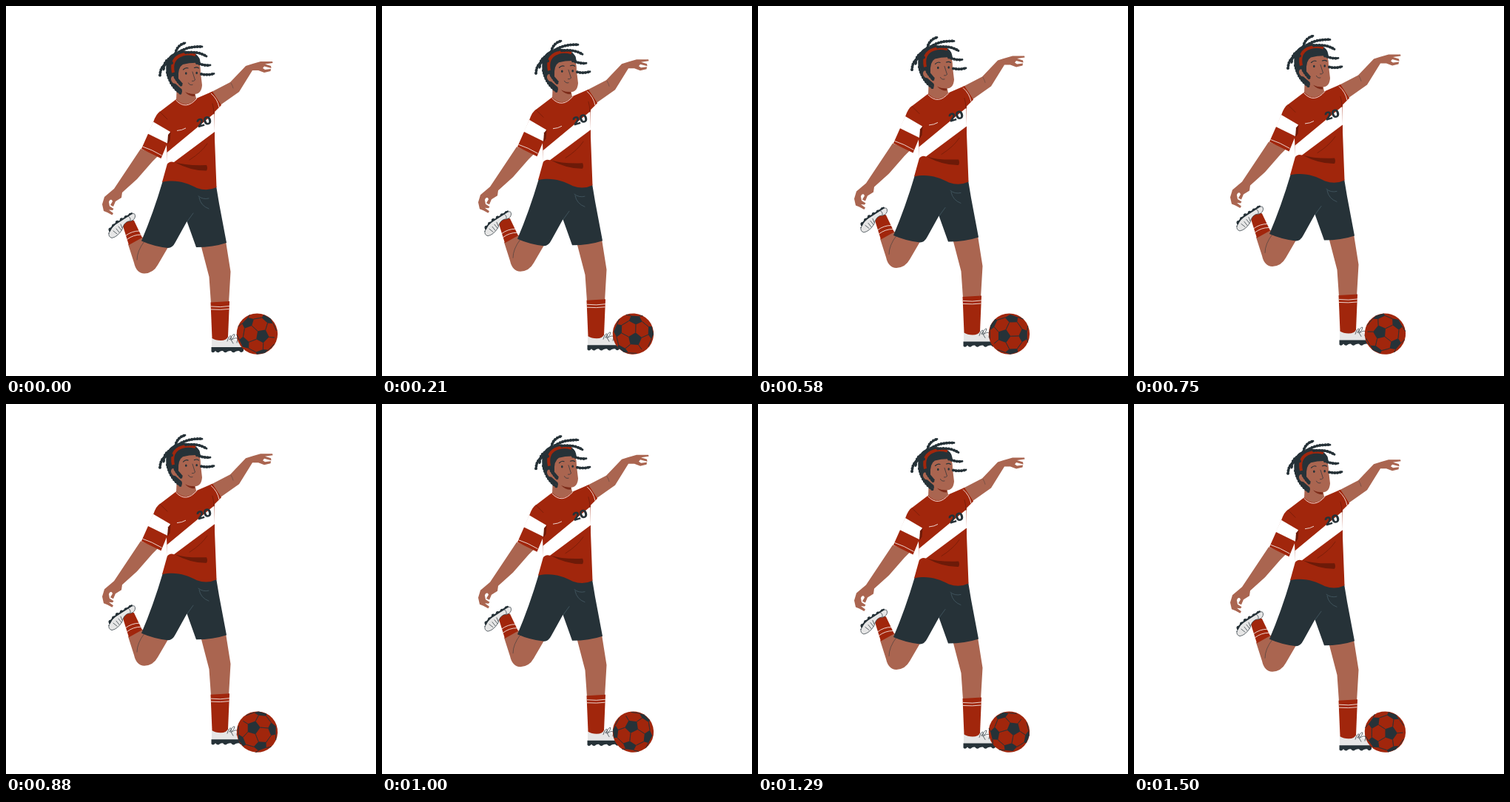
Write an HTML page that moves like this. It is 500 by 500 pixels and loops after 1540 ms.

```html
<!DOCTYPE html>
<html lang="en">
<head>
<meta charset="utf-8">
<title>Football player</title>
<style>
  html, body { margin: 0; width: 100%; height: 100%; overflow: hidden; background: #fff; }
  svg { display: block; width: 100%; height: 100%; }
  .red { fill: #a1260c; }
  .dark { fill: #263238; }
  .skin { fill: #aa6550; }
  .shoe { fill: #e6e6e6; }
  .fold { fill: #6d1a08; }
  .white { fill: #fff; }
  .line { fill: none; stroke: #263238; stroke-width: .7; stroke-linecap: round; stroke-linejoin: round; }
  .trim { fill: none; stroke: #fff; stroke-width: .8; }
  .seam { fill: none; stroke: #263238; stroke-width: .6; }
  .dread { fill: none; stroke: #263238; stroke-width: 2.8; stroke-linecap: round; }
  .beads { fill: none; stroke: #263238; stroke-width: 4; stroke-linecap: round; stroke-dasharray: 0 3.7; }
  text { font: 900 15.5px Inter, "Open Sans", sans-serif; letter-spacing: -.6px; }
</style>
</head>
<body>
<svg viewBox="0 0 500 500">
  <g id="player">
    <!-- raised arm -->
    <path class="skin" d="M276 117L303 103L324 81Q333 78 344 75L360 75L360.500 77L350 78.500L358 81L358.500 84L349 81.500L347 84L350 86L358 85L357.500 88L349 90L341 87L333 87L315 116L288 135Z"/>
    <path class="line" d="M304 104Q306 107 307 111" stroke-opacity=".5"/>

    <!-- lowered arm -->
    <path class="skin" d="M182 193L146 247L133 258L130 268L132 277L137 279L143.500 282.500L145 280L139 275.500L144 276L145.500 274L140 270.500L139 265Q140 261 143 262L144 264L141 269L145 271L148 264L156 259L157 252L177 234L198 210L206 202Z"/>

    <!-- back leg -->
    <path class="skin" d="M183 312L165 322L173 347Q176 361 187 361.500Q199 361 205 350L219 326Z"/>
    <path class="line" d="M187 318Q177 331 177 343" stroke-opacity=".7"/>
    <path class="red" d="M157 294Q164 285 173 290L184 313L166 323Z"/>
    <path class="trim" d="M161.500 310.500Q170 304 180.500 304M163.500 315.500Q172 309 182.500 309"/>
    <path class="beads" d="M141 302L149 293L171 280.500" style="stroke-dasharray:0 6.800;stroke-width:5"/>
    <path class="shoe line" style="fill:#e6e6e6" d="M139 307Q142 299 149 294L170 281Q175 279 174.500 285Q173 291 165 291Q159 293 157 302Q151 312 143 313.500Q138 312 139 307Z"/>
    <path class="line" d="M140 304Q143 297 150 293L170 280" style="stroke-width:2"/>
    <path class="line" d="M145 304L150 308M149 301L153 306M152 298L156 303M155 295L157 300M165 284Q169 286 168 290"/>

    <!-- standing leg -->
    <path class="skin" d="M263 322L274.500 366L277 402L301 402L303.500 359L297 318Z"/>
    <path class="shoe" d="M278 448L299 446L311 452Q320 455 322 462L278 462Z"/>
    <path class="dark" d="M277.500 461H321V466Q318 470 315 466Q312 466 310 467Q307 470 304 466Q301 466 299 467Q296 470 293 466Q290 466 289 467Q286 470 283 466Q280 470 277.500 467Z"/>
    <path class="red" d="M276.500 400.500L302 399L300 447Q298 452 290 452Q283 452 278.500 449Z"/>
    <path class="trim" d="M277 406Q290 407.500 302 405.500M277 410Q290 411 301.500 409.500"/>
    <path class="line" d="M299 453Q302 444 304 446Q306 449 302 451Q307 442 309 444Q309 448 304 451M304 451L307 456M305 451Q311 447 313 450L312 455"/>

    <!-- shorts -->
    <path class="dark" d="M212 236C228 232 246 239 258 245L284 243L288 267L298 320Q280 326 257 326L244.500 291L229 319Q225 327 219 327Q200 325 183 317.500Q199 280 212 236Z"/>
    <path class="line" style="stroke:#4a606b" d="M260 257Q266 262 274 260M261 259Q263 270 274 274M245 291L253 280"/>

    <!-- neck -->
    <path class="skin" d="M231 105L230 127Q244 140 257 125L255 115Z"/>
    <path class="fold" d="M242 116Q248 119 255 118.500L255 122Q247 122 242 116Z" opacity=".75"/>

    <!-- shirt -->
    <path class="red" d="M230 126Q243 140 257 125L279 115.500L291 134L282 143L282 180L284.500 245Q272 251 258 246C244 239 230 234 211 238L218 213L217 188L209.500 206L183 193L199 157Q203 145 209 142Z"/>
    <path class="white" d="M199 156.500L222 170L218 185.500L191.500 172.500Z"/>
    <path class="white" d="M281.500 145L217.500 198V214Q221 209 227 211L282 170Z"/>
    <path class="fold" d="M222.500 170L221.500 182L218 187L219 174Z"/>
    <path class="fold" d="M228 211Q243 216 271 215Q273 219 271 222.500Q250 223 228 211Z"/>
    <path class="line" style="stroke:#6d1a08" d="M208 143L218 153M248 208Q264 198 272 186M279 132Q281 139 281 146"/>
    <path class="trim" d="M184.500 190Q197 194 210.500 202M231 168.500Q238 168 243 165M277 118Q286 126 288 137M229.500 127Q243 142 258 125"/>
    <text class="dark" transform="translate(259.500 164.500) rotate(-17)">20</text>

    <!-- head -->
    <path class="dark" d="M217 93Q214 73 223 66Q237 56 255 64Q264 70 262 78L236 88L238 117Q225 111 217 93Z"/>
    <path class="skin" d="M233 80Q243 72 259 73Q263 78 263 90L265 107Q264 119 255 119Q244 119 237 112L229 105Q222 104 223 98Q224 93 230 96Z"/>
    <path class="dark" d="M230 73L260 69L263 77Q250 76 239 79Q232 83 233 98L239 105L236 109L227 97Z"/>
    <path fill="none" stroke="#a1260c" stroke-width="4" d="M226 90Q222 71 238 66Q246 63 256 66"/>
    <g id="hair"></g>
    <ellipse class="dark" cx="243.300" cy="91" rx="1.300" ry="1.700"/>
    <ellipse class="dark" cx="257.700" cy="90.500" rx="1.300" ry="1.700"/>
    <path class="line" style="stroke-width:1.200" d="M239.500 86Q243 82.500 246 84M254.500 83.500Q258 82 260.500 84"/>
    <path class="line" d="M252 89L255.500 100Q254 102 251.500 101.500M246.500 104Q248 107.500 252 106.500"/>
  </g>
  <g id="ball"><circle class="red" r="27.700"/></g>
</svg>
<script>
const LOOP = 1540, RADIUS = 27.7;
const player = document.getElementById("player");
const ball = document.getElementById("ball");
const hair = document.getElementById("hair");

function addPath(parent, className, d) {
  const path = document.createElementNS("http://www.w3.org/2000/svg", "path");
  path.setAttribute("class", className);
  path.setAttribute("d", d);
  parent.append(path);
}

// Each braid is a strand with round beads.
[
  "M224 77Q209 77 208 94", "M223 70Q213 74 213 86",
  "M229 64Q231 53 242 50", "M234 62Q247 54 265 55",
  "M243 63Q260 61 271 68", "M258 77Q268 81 276 80",
  "M264 92Q272 94 281 91.500", "M218 90Q222 109 236 118",
  "M227 93Q231 102 237 107"
].forEach(d => ["dread", "beads"].forEach(name => addPath(hair, name, d)));

// Ball panels: icosahedron corners seen from slightly off centre.
function onSphere(polar, turn) {
  const tilt = 17 * Math.PI / 180;
  const x = Math.sin(polar) * Math.cos(turn), y = Math.sin(polar) * Math.sin(turn), z = Math.cos(polar);
  return [x * Math.cos(tilt) + z * Math.sin(tilt), y, z * Math.cos(tilt) - x * Math.sin(tilt)];
}
const dot = (a, b) => a.reduce((sum, v, i) => sum + v * b[i], 0);
function oneThird(a, b) {
  const p = a.map((v, i) => 2 * v + b[i]), length = Math.hypot(...p);
  return p.map(v => v / length);
}
function project([x, y, z]) {
  const k = RADIUS / (z < 0 ? Math.hypot(x, y) : 1);
  return (x * k).toFixed(2) + " " + (y * k).toFixed(2);
}

const front = [onSphere(0, 0)];
for (let i = 0; i < 5; i++) front.push(onSphere(Math.atan(2), (72 * i - 13) * Math.PI / 180));
const corners = [...front, ...front.map(p => p.map(v => -v))];

for (const a of corners) {
  const near = corners.filter(b => b !== a && dot(a, b) > .4);
  for (const b of near) {
    const p = oneThird(a, b), q = oneThird(b, a);
    if (p[2] > 0 && q[2] > 0) addPath(ball, "seam", `M${project(p)}L${project(q)}`);
  }
  if (a[2] < .2) continue;
  // Walk round the panel from neighbour to neighbour.
  const ring = [near.shift()];
  while (near.length) {
    const next = near.findIndex(b => dot(b, ring[ring.length - 1]) > .4);
    ring.push(near.splice(next, 1)[0]);
  }
  addPath(ball, "dark", "M" + ring.map(b => project(oneThird(a, b))).join("L") + "Z");
}

function draw(now) {
  const phase = now % LOOP / LOOP;
  const bob = (phase + .018) % 1;
  const lift = 10 * (1 - Math.abs(1 - 2 * bob));
  player.setAttribute("transform", `translate(0 ${.35 - lift})`);
  ball.setAttribute("transform", `translate(339.400 443.100) rotate(${22 + 360 * phase})`);
}

const start = performance.now();
function tick() {
  draw(performance.now() - start);
  requestAnimationFrame(tick);
}
tick();
</script>
</body>
</html>
```
